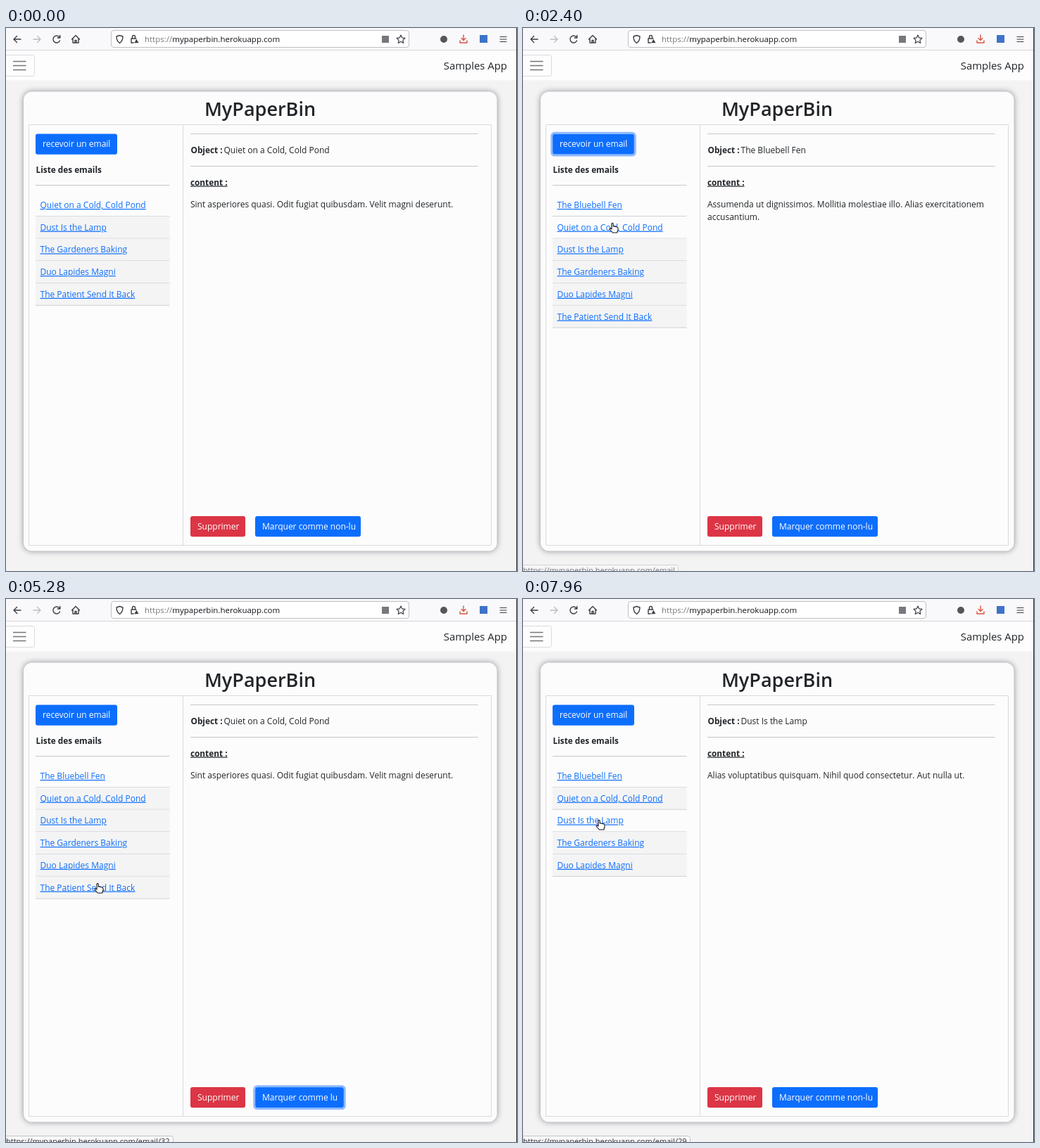
Animation, 726 px wide and 772 px high, one loop 8 s. Source, as an HTML page:

```html
<!DOCTYPE html>
<html lang="fr">
<head>
<meta charset="utf-8">
<title>MyPaperBin</title>
<style>
  html, body { margin: 0; width: 100%; height: 100%; overflow: hidden; background: #f3f3f4; }
  svg { display: block; font: 12px "Open Sans", "Noto Sans", sans-serif; fill: #212529; }
  .bold { font-weight: 700; font-size: 11.8px; }
  .under, .link { text-decoration: underline; }
  .link { fill: #0d6efd; }
  .label { fill: #fff; }
  .rule { stroke: #c6c7ca; }
  .frame { fill: none; stroke: #d9dade; }
  .icon { fill: none; stroke: #3c3c44; stroke-width: 1.4; stroke-linecap: round; stroke-linejoin: round; }
  .card { fill: #fcfcfc; filter: drop-shadow(0 0 4px rgba(0, 0, 20, .42)); }
  .ring { fill: none; stroke: #8dbafe; stroke-width: 3; }
</style>
</head>
<body>
<svg id="stage" width="726" height="772" viewBox="0 0 726 772">
  <!-- browser toolbar -->
  <rect width="726" height="32" fill="#f9f9fb"/>
  <path d="M0 31.5H726" stroke="#d8d8dc"/>
  <rect x="149.5" y="3.5" width="423" height="24" rx="3.5" fill="#fff" stroke="#bfbfc5"/>
  <g class="icon">
    <path d="M21 16H11M15.500 11.500L11 16L15.500 20.500"/>
    <path d="M39 16H49M44.500 11.500L49 16L44.500 20.500" stroke="#bdbdc1"/>
    <path d="M76 13A5 5 0 1 0 76.500 18M76.800 10.500V14H73.300"/>
    <path d="M93.500 16L99 10.500L104.500 16M95 15V21H103V15M98 21V17.500H100V21"/>
    <path d="M161.500 10.500L166 12C166 17 164.500 19.500 161.500 21.500C158.500 19.500 157 17 157 12Z"/>
    <path d="M178 15H185V21H178ZM179.500 15V12.500A2 2 0 0 1 183.500 12.500V15"/>
    <path d="M185.500 15.500L189 21.500H182Z" fill="#3c3c44" stroke="#fff" stroke-width=".7"/>
    <path d="M561 10L562.800 13.900L567 14.400L563.900 17.200L564.700 21.400L561 19.300L557.300 21.400L558.100 17.200L555 14.400L559.200 13.900Z" stroke-width="1.200"/>
    <path d="M650 10V17M647 14.500L650 17.500L653 14.500M645 18V21H655V18" stroke="#d8543f"/>
    <path d="M702 12.500H711M702 16H711M702 19.500H711" stroke-width="1.200"/>
  </g>
  <rect x="534" y="11" width="10" height="10" fill="#77777d"/>
  <circle cx="622" cy="16" r="5" fill="#55555c"/>
  <rect x="673" y="10" width="11" height="11" fill="#3f73c9"/>
  <text x="197" y="20" font-size="11.5" fill="#777">https://<tspan fill="#15141a">mypaperbin.herokuapp.com</tspan></text>

  <!-- page header -->
  <rect y="32" width="726" height="42.500" fill="#fdfdfd"/>
  <rect x="-4.500" y="38.500" width="45" height="30" rx="3" class="frame"/>
  <path d="M10 47.500H28.500M10 53.500H28.500M10 59.500H28.500" stroke="#74767a" stroke-width="1.400"/>
  <text x="712" y="59" font-size="14.9" text-anchor="end">Samples App</text>

  <!-- mailbox card -->
  <rect x="25" y="90.500" width="672.500" height="653" rx="12" class="card"/>
  <text x="361" y="125" font-size="27" font-weight="600" text-anchor="middle">MyPaperBin</text>
  <path d="M32.500 137.500H689.500V735.500H32.500ZM251.500 137.500V735.500" class="frame"/>
  <path d="M42 223.500H232.500M262 150.500H670.500M262 196.500H670.500" class="rule"/>
  <text x="42.500" y="206" class="bold">Liste des emails</text>
  <text x="262.500" y="178" class="bold">Object :</text>
  <text x="309.500" y="178" id="subject"></text>
  <text x="262" y="223.500" class="bold under">content :</text>
  <text x="262" y="254.500" id="line0"></text>
  <text x="262" y="273" id="line1"></text>
  <g id="list"></g>
  <g id="buttons"></g>
  <path d="M725.500 0V772" stroke="#303036"/>

  <g id="status">
    <rect id="statusBox" x="-4.500" y="763.500" height="14" rx="3" fill="#f9f9fb" stroke="#c4c4c9"/>
    <text id="statusText" y="775" font-size="11" fill="#2b2a33"></text>
  </g>
  <g id="cursor" stroke-linejoin="round">
    <path id="arrow" d="M0 0V12L2.800 9.600L4.700 13.600L6.700 12.700L4.900 8.800H8.500Z" fill="#111" stroke="#fff" stroke-width=".8"/>
    <path id="hand" d="M-1 1.200Q0 -.6 1.200 1.200V5L3 4.900L4.600 5.400L6.200 5.700Q8 6 8 8V10L6.700 14H.3L-3.600 9.500Q-4.500 7.600 -2.600 7.700L-1 9Z" fill="#fff" stroke="#15151a" stroke-width="1.100"/>
  </g>
</svg>
<script>
const LOOP = 8000, ROW = 31.7, FADE = 160;
const $ = id => document.getElementById(id);

const mails = [
  ["The Bluebell Fen", "Assumenda ut dignissimos. Mollitia molestiae illo. Alias exercitationem", "accusantium."],
  ["Quiet on a Cold, Cold Pond", "Sint asperiores quasi. Odit fugiat quibusdam. Velit magni deserunt."],
  ["Dust Is the Lamp", "Alias voluptatibus quisquam. Nihil quod consectetur. Aut nulla ut."],
  ["The Gardeners Baking"],
  ["Duo Lapides Magni"],
  ["The Patient Send It Back", "Dolorem est officia. Ea placeat sed. Ut distinctio beatae."]
];

const states = [
  { at: 0, first: 1, last: 5, open: 1, read: [1] },
  { at: 1640, first: 0, last: 5, open: 0, read: [0, 1] },
  { at: 2800, first: 0, last: 5, open: 1, read: [0, 1] },
  { at: 4000, first: 0, last: 5, open: 1, read: [0] },
  { at: 5400, first: 0, last: 5, open: 5, read: [0, 5] },
  { at: 6600, first: 0, last: 4, open: 2, read: [0, 2] }
];

// time, x, y of the pointer tip
const pointer = [
  [360, 725, 420], [880, 95, 158], [2260, 95, 158], [2400, 127, 277], [3330, 127, 277],
  [3520, 384, 683], [3640, 391, 704], [4700, 391, 704], [5200, 130, 404], [5760, 130, 404],
  [6220, 317, 704], [6640, 317, 704], [6900, 108, 314], [LOOP, 108, 314]
];

// shown from, fades from, end of the address
const hints = [
  [940, 2340, ""], [2460, 3440, "/28"], [3640, 4700, "/28"],
  [5160, 5760, "/32"], [6300, 6640, "/32"], [6880, LOOP, "/29"]
];

const buttons = [
  { x: 42, y: 150.5, w: 116, text: "recevoir un email", fill: "#0d6efd", hover: "#0b5ed7", focus: [1560, 2780] },
  { x: 262, y: 694, w: 78, text: "Supprimer", fill: "#dc3545", hover: "#c9303e", focus: [6480, 6600] },
  { x: 354, y: 694, w: 150, text: "Marquer comme non-lu", fill: "#0d6efd", hover: "#0b5ed7", focus: [3960, 5380] }
];

function add(parent, tag, attrs) {
  const node = document.createElementNS("http://www.w3.org/2000/svg", tag);
  for (const key in attrs) node.setAttribute(key, attrs[key]);
  return parent.appendChild(node);
}

const rows = mails.map((_, i) => {
  const g = add($("list"), "g", { transform: `translate(0 ${i * ROW})` });
  return {
    g,
    back: add(g, "rect", { x: 42, y: 236, width: 190.5, height: ROW, fill: "#f4f4f5" }),
    line: add(g, "path", { d: "M42 267.500H232.500", stroke: "#cfd1d8" }),
    link: add(g, "text", { x: 48.5, y: 256, class: "link" })
  };
});

for (const b of buttons) {
  const g = add($("buttons"), "g", { transform: `translate(${b.x} ${b.y})` });
  b.box = add(g, "rect", { width: b.w, height: 29.3, rx: 3 });
  b.ring = add(g, "rect", { x: -1.2, y: -1.2, width: b.w + 2.4, height: 31.7, rx: 4, class: "ring" });
  b.label = add(g, "text", { x: 10, y: 18.5, class: "label" });
  b.label.textContent = b.text;
}

const show = (node, on) => node.setAttribute("visibility", on ? "visible" : "hidden");
const within = (v, from, to) => v >= from && v < to;

function pointerAt(t) {
  const i = pointer.findIndex(p => p[0] > t);
  if (i < 1) return null;
  const [t0, x0, y0] = pointer[i - 1], [t1, x1, y1] = pointer[i];
  const k = (t - t0) / (t1 - t0), e = k * k * (3 - 2 * k);
  return { x: x0 + (x1 - x0) * e, y: y0 + (y1 - y0) * e };
}

function drawMail(state) {
  const [subject, line0, line1 = ""] = mails[state.open];
  $("subject").textContent = subject;
  $("line0").textContent = line0;
  $("line1").textContent = line1;
  rows.forEach((row, i) => {
    const id = state.first + i, used = id <= state.last;
    row.g.setAttribute("display", used ? "inline" : "none");
    if (!used) return;
    row.link.textContent = mails[id][0];
    row.back.setAttribute("opacity", state.read.includes(id) ? 0 : 1);
  });
}

function drawButtons(t, state, tip) {
  const unread = !state.read.includes(state.open);
  buttons[2].w = unread ? 126 : 150;
  buttons[2].label.textContent = unread ? "Marquer comme lu" : buttons[2].text;
  let hovered = false;
  for (const b of buttons) {
    const over = tip && within(tip.x, b.x, b.x + b.w) && within(tip.y, b.y, b.y + 29.3);
    hovered = hovered || over;
    b.box.setAttribute("width", b.w);
    b.ring.setAttribute("width", b.w + 2.4);
    b.box.setAttribute("fill", over ? b.hover : b.fill);
    show(b.ring, within(t, ...b.focus));
  }
  return hovered;
}

function drawPointer(state, tip, onButton) {
  show($("cursor"), tip);
  if (!tip) return $("cursor").setAttribute("display", "none");
  $("cursor").setAttribute("display", "inline");
  const row = Math.floor((tip.y - 245) / ROW);
  const onLink = within(row, 0, state.last - state.first + 1) &&
    (tip.y - 245) - row * ROW < 15 && within(tip.x, 48, 190);
  $("cursor").setAttribute("transform", `translate(${tip.x} ${tip.y})`);
  $("hand").setAttribute("display", onButton || onLink ? "inline" : "none");
  $("arrow").setAttribute("display", onButton || onLink ? "none" : "inline");
}

function drawStatus(t) {
  const hint = hints.find(([from, to]) => within(t, from, to + FADE));
  $("status").setAttribute("opacity", hint ? Math.min(1, 1 - (t - hint[1]) / FADE) : 0);
  if (!hint) return;
  $("statusText").textContent = "https://mypaperbin.herokuapp.com/email" + hint[2];
  $("statusBox").setAttribute("width", hint[2] ? 242 : 225);
}

function draw(now) {
  const t = now % LOOP;
  const state = states.findLast(s => s.at <= t);
  const tip = pointerAt(t);
  drawMail(state);
  drawPointer(state, tip, drawButtons(t, state, tip));
  drawStatus(t);
}

const start = performance.now();
function tick() {
  draw(performance.now() - start);
  requestAnimationFrame(tick);
}
tick();
</script>
</body>
</html>
```
